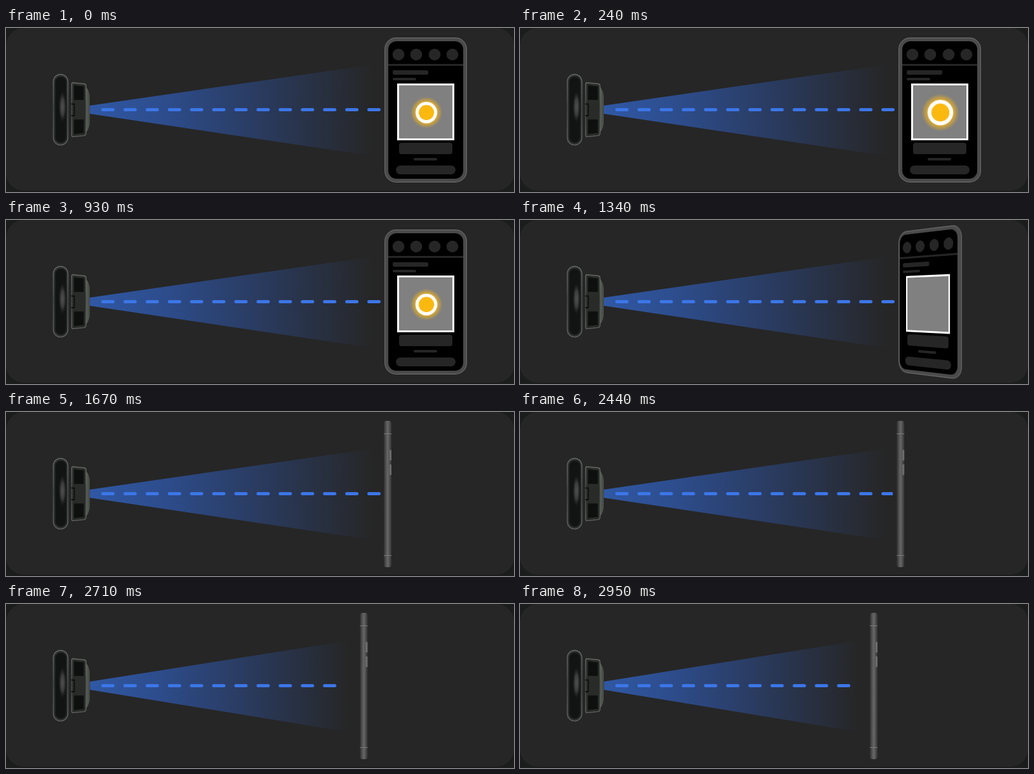
An HTML page that plays this animation: 800x260 px, repeating every 4480 ms.

```html
<!DOCTYPE html>
<html lang="en">
<head>
<meta charset="utf-8">
<title>Scanning a phone</title>
<style>
  html, body { margin: 0; width: 100%; height: 100%; overflow: hidden; background: #1b1c1c; }
  .stage { position: relative; width: 800px; height: 260px; overflow: hidden; }
  .stage > *, .phone > svg { position: absolute; display: block; }
  .card { width: 800px; height: 258px; border-radius: 28px; background: #262626; }

  .stage > *, .phone > svg, .sun {
    animation: 4480ms infinite;
    --out: cubic-bezier(.3333, .5236, .6667, 1);
    --in: cubic-bezier(.3333, 0, .6667, .4764);
    --inout: cubic-bezier(.3642, 0, .6358, 1);
  }

  .beam {
    left: 132px; top: 58px; width: 446px; height: 145px;
    clip-path: polygon(0 65px, 100% 0, 100% 100%, 0 78px);
    background: linear-gradient(90deg, #3058a4, #2d4d8d 25%, #2a3b5f 60%, #262626);
    transform-origin: 0 0;
    animation-name: shrink !important;
  }
  @keyframes shrink {
    0%, 53.795% { transform: none; animation-timing-function: var(--out); }
    65.848%, 100% { transform: scaleX(.9013); }
  }

  .dashes { left: 0; top: 120px; width: 590px; height: 20px; overflow: hidden; animation-name: trim !important; }
  @keyframes trim {
    0%, 53.795% { width: 590px; animation-timing-function: var(--inout); }
    65.848%, 100% { width: 520px; }
  }

  .phone { left: 596px; top: 15px; width: 130px; height: 230px; animation-name: front !important; }
  @keyframes front {
    0% { visibility: visible; animation-timing-function: step-end; }
    37.276%, 100% { visibility: hidden; }
  }
  .phone > svg { left: 0; top: 0; transform-origin: 0 50%; overflow: visible; }
  .frame { animation-name: turn-frame !important; }
  .screen { animation-name: turn-screen !important; }
  @keyframes turn-frame {
    0% { transform: none; animation-timing-function: step-end; }
    29.91%, 100% { transform: matrix3d(.6915,0,0,-.000777, 0,.965,0,0, 0,0,1,0, 0,0,0,1); }
  }
  @keyframes turn-screen {
    0% { transform: none; animation-timing-function: step-end; }
    29.91%, 100% { transform: translateX(-2px) matrix3d(.6915,0,0,-.000777, 0,.965,0,0, 0,0,1,0, 0,0,0,1); }
  }

  .sun { transform-origin: 66px 119px; animation-name: pulse, sunset; }
  @keyframes pulse {
    0% { transform: scale(1); animation-timing-function: var(--out); }
    12.054% { transform: scale(1.25); animation-timing-function: var(--in); }
    24.107%, 100% { transform: scale(1); }
  }
  @keyframes sunset {
    0% { opacity: 1; animation-timing-function: step-end; }
    24.776%, 100% { opacity: 0; }
  }

  .side { left: 595px; top: 14px; animation-name: side, slide !important; }
  @keyframes side {
    0% { visibility: hidden; animation-timing-function: step-end; }
    37.276%, 100% { visibility: visible; }
  }
  @keyframes slide {
    0%, 53.795% { transform: none; animation-timing-function: var(--out); }
    65.848%, 100% { transform: translateX(-44px); }
  }
</style>
</head>
<body>
<div class="stage">
  <div class="card"></div>
  <div class="beam"></div>

  <div class="dashes">
    <svg width="600" height="20">
      <path d="M152.5 9.5H587.6" stroke="#3c76e8" stroke-width="5" stroke-linecap="round" stroke-dasharray="16 18.92"/>
    </svg>
  </div>

  <svg class="camera" width="140" height="260">
    <defs>
      <linearGradient id="rim" x2="0" y2="1">
        <stop stop-color="#686a68"/><stop offset=".5" stop-color="#4a4c4a"/><stop offset="1" stop-color="#626462"/>
      </linearGradient>
      <linearGradient id="lens">
        <stop stop-color="#5c605b"/><stop offset="1" stop-color="#434743"/>
      </linearGradient>
      <radialGradient id="gloss">
        <stop stop-color="#505050"/><stop offset=".5" stop-color="#3a3a3a"/><stop offset="1" stop-color="#121413" stop-opacity="0"/>
      </radialGradient>
    </defs>
    <rect x="74.5" y="73.5" width="23" height="112" rx="11.5" fill="#303231" stroke="url(#rim)" stroke-width="1.4"/>
    <rect x="77.5" y="77" width="17.5" height="105" rx="8.7" fill="#121413" stroke="#1e201f" stroke-width="1.5"/>
    <ellipse cx="89" cy="125" rx="6.5" ry="27" fill="url(#gloss)"/>
    <path d="M126 93Q131 100 132 108V152Q131 159 126 166Z" fill="url(#lens)"/>
    <path d="M105 86.7L123 88.5Q126 89 126 92V167Q126 170 123 170.6L105 172.4Q103.5 172.4 103.5 170V89Q103.5 86.7 105 86.7Z" fill="#292b29" stroke="url(#rim)" stroke-width="1.4"/>
    <path d="M107 91L122.500 92.500V114H107ZM107 145H122.500V166.500L107 168Z" fill="#0e100f"/>
    <path d="M107 114H124V145H107Z" fill="#292b28"/>
    <path d="M103 120.500H107.500V139H103" fill="none" stroke="#0e100f" stroke-width="1.8"/>
  </svg>

  <div class="phone">
    <svg class="frame" width="130" height="230">
      <rect x=".6" y=".6" width="128.800" height="228.800" rx="18" fill="#4a4a4a" stroke="#686868" stroke-width="1.200"/>
    </svg>
    <svg class="screen" width="130" height="230">
      <defs>
        <radialGradient id="glow">
          <stop offset=".62" stop-color="#fbb914" stop-opacity=".85"/>
          <stop offset="1" stop-color="#fbb914" stop-opacity="0"/>
        </radialGradient>
      </defs>
      <rect x="6" y="6" width="118" height="218" rx="13"/>
      <g fill="#262626">
        <circle cx="22" cy="27" r="9.300"/>
        <circle cx="50" cy="27" r="9.300"/>
        <circle cx="79" cy="27" r="9.300"/>
        <circle cx="107" cy="27" r="9.300"/>
        <rect x="6" y="42" width="118" height="3"/>
        <rect x="13" y="52" width="56" height="7" rx="2"/>
        <rect x="13" y="64" width="37" height="4" rx="2"/>
        <rect x="23" y="167" width="84" height="18" rx="4"/>
        <rect x="46" y="191" width="37" height="4" rx="2"/>
        <rect x="18" y="203" width="94" height="14" rx="7"/>
      </g>
      <rect x="21.500" y="74.500" width="87" height="87" fill="#808080" stroke="#fff" stroke-width="3"/>
      <g class="sun">
        <circle cx="66" cy="119" r="25" fill="url(#glow)"/>
        <circle cx="66" cy="119" r="17" fill="#fff"/>
        <circle cx="66" cy="119" r="12" fill="#fbb90f"/>
      </g>
    </svg>
  </div>

  <svg class="side" width="12" height="232">
    <defs>
      <linearGradient id="edge">
        <stop stop-color="#2e2e2e"/><stop offset=".2" stop-color="#484848"/>
        <stop offset=".5" stop-color="#686868"/><stop offset=".75" stop-color="#505050"/>
        <stop offset="1" stop-color="#323232"/>
      </linearGradient>
    </defs>
    <rect width="12" height="232" rx="4" fill="url(#edge)"/>
    <path d="M0 20.500H12M0 213.500H12" stroke="#7c7c7c"/>
    <rect x="9" y="46" width="3" height="17" rx="1" fill="#6c6c6c"/>
    <rect x="9" y="69" width="3" height="17" rx="1" fill="#6c6c6c"/>
  </svg>
</div>
</body>
</html>
```
